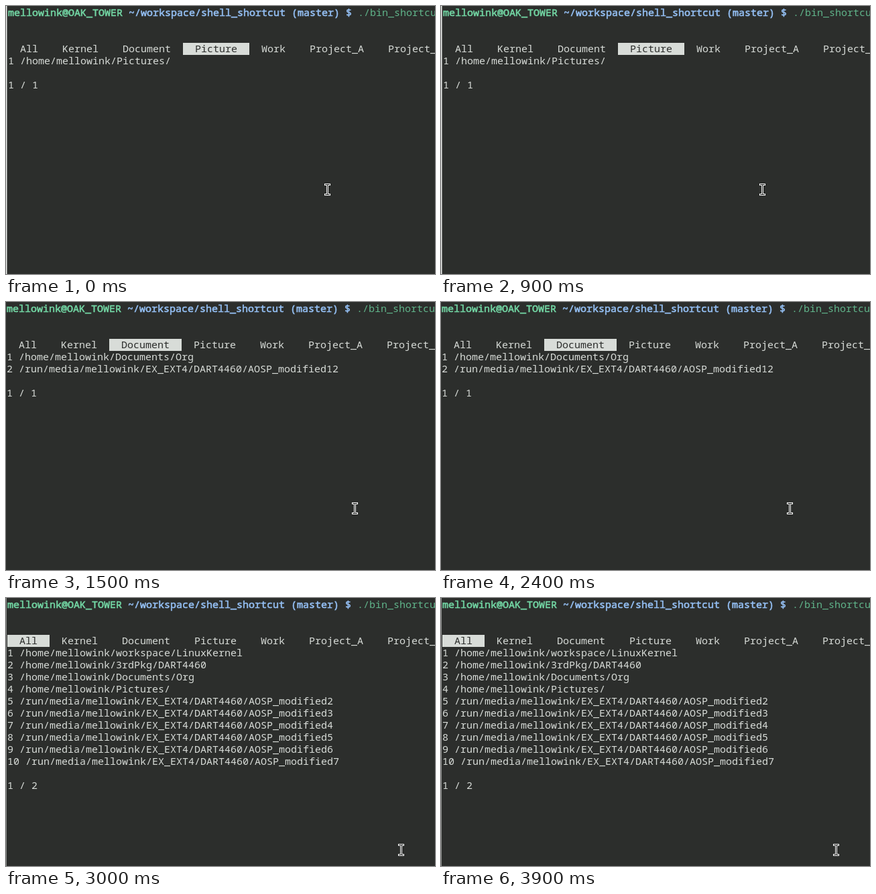
An HTML page for the animation above (4.5 s loop, 640x400 px).

```html
<!DOCTYPE html>
<html lang="en">
<head>
<meta charset="utf-8">
<title>Shell shortcut menu</title>
<style>
  html, body { margin: 0; width: 100%; height: 100%; overflow: hidden; background: #2c2e2c; }
  svg { display: block; width: 640px; height: 400px; }
  text { font: 15px "Noto Sans Mono", "DejaVu Sans Mono", monospace; white-space: pre; fill: #d8dcd8; }
  .user, .path { stroke-width: .6; }
  .user { fill: #72d5a3; stroke: #72d5a3; }
  .path { fill: #94bff3; stroke: #94bff3; }
  .cmd { fill: #60b48a; }
  .dark { fill: #2c2e2c; }
  .bar { fill: #d8dcd8; }
  .desk { fill: #eef0ee; }
  .edge { fill: #8a8c8a; }
  .beam { fill: none; stroke: #fff; stroke-width: 3; stroke-linecap: square; }
  .core { stroke: #1a1b1a; stroke-width: 1; }
</style>
</head>
<body>
<svg id="stage" viewBox="0 0 640 400"></svg>
<script>
const CELL = 9, ROW = 18, HOLD = 1500;
const USER = 'mellowink', HOST = 'OAK_TOWER';
const TABS = ['All', 'Kernel', 'Document', 'Picture', 'Work', 'Project_A', 'Project_B'];
const HOME = `/home/${USER}/`;
const aosp = n => `/run/media/${USER}/EX_EXT4/DART4460/AOSP_modified${n}`;

// left: text origin, mouse: centre of the pointer
const VIEWS = [
  { left: 3, tab: 3, mouse: [480, 274], pages: 1, list: [HOME + 'Pictures/'] },
  { left: 1, tab: 2, mouse: [521, 308], pages: 1, list: [HOME + 'Documents/Org', aosp(12)] },
  { left: 2, tab: 0, mouse: [590, 376], pages: 2, list: [
    HOME + 'workspace/LinuxKernel', HOME + '3rdPkg/DART4460',
    HOME + 'Documents/Org', HOME + 'Pictures/',
    ...[2, 3, 4, 5, 6, 7].map(aosp)] }
];

const stage = document.getElementById('stage');

function add(parent, tag, attrs, text = '') {
  const el = document.createElementNS('http://www.w3.org/2000/svg', tag);
  for (const key in attrs) el.setAttribute(key, attrs[key]);
  el.textContent = text;
  return parent.appendChild(el);
}

function drawView({ left, tab, mouse, pages, list }) {
  const g = add(stage, 'g', {});
  const put = (col, row, text, cls = '') =>
    add(g, 'text', { x: left + col * CELL, y: 15 + row * ROW, class: cls }, text);

  // window border with the desktop beyond it
  add(g, 'rect', { x: left - 3, width: 1, height: 400, class: 'desk' });
  add(g, 'rect', { x: left - 2, width: 1, height: 400, class: 'edge' });

  const who = `${USER}@${HOST}`;
  const where = '~/workspace/shell_shortcut (master) $';
  put(0, 0, who, 'user');
  put(who.length + 1, 0, where, 'path');
  put(who.length + where.length + 2, 0, './bin_shortcut', 'cmd');

  let col = 0;
  TABS.forEach((name, i) => {
    const width = name.length + 4;
    if (i === tab) {
      add(g, 'rect', { x: left + col * CELL, y: 1 + 3 * ROW,
        width: width * CELL, height: ROW, class: 'bar' });
    }
    put(col + 2, 3, name, i === tab ? 'dark' : '');
    col += width;
  });

  list.forEach((path, i) => put(0, 4 + i, `${i + 1} ${path}`));
  put(0, 5 + list.length, `1 / ${pages}`);

  const [x, y] = mouse.map(v => v - .5);
  const shape = `M${x - 3} ${y - 7}h6M${x - 3} ${y + 8}h6M${x} ${y - 7}v15`;
  add(g, 'path', { d: shape, class: 'beam' });
  add(g, 'path', { d: shape, class: 'beam core' });
  return g;
}

const views = VIEWS.map(drawView);
const start = performance.now();

function tick() {
  const now = Math.floor((performance.now() - start) / HOLD) % views.length;
  views.forEach((g, i) => { g.style.display = i === now ? '' : 'none'; });
  requestAnimationFrame(tick);
}
tick();
</script>
</body>
</html>
```
